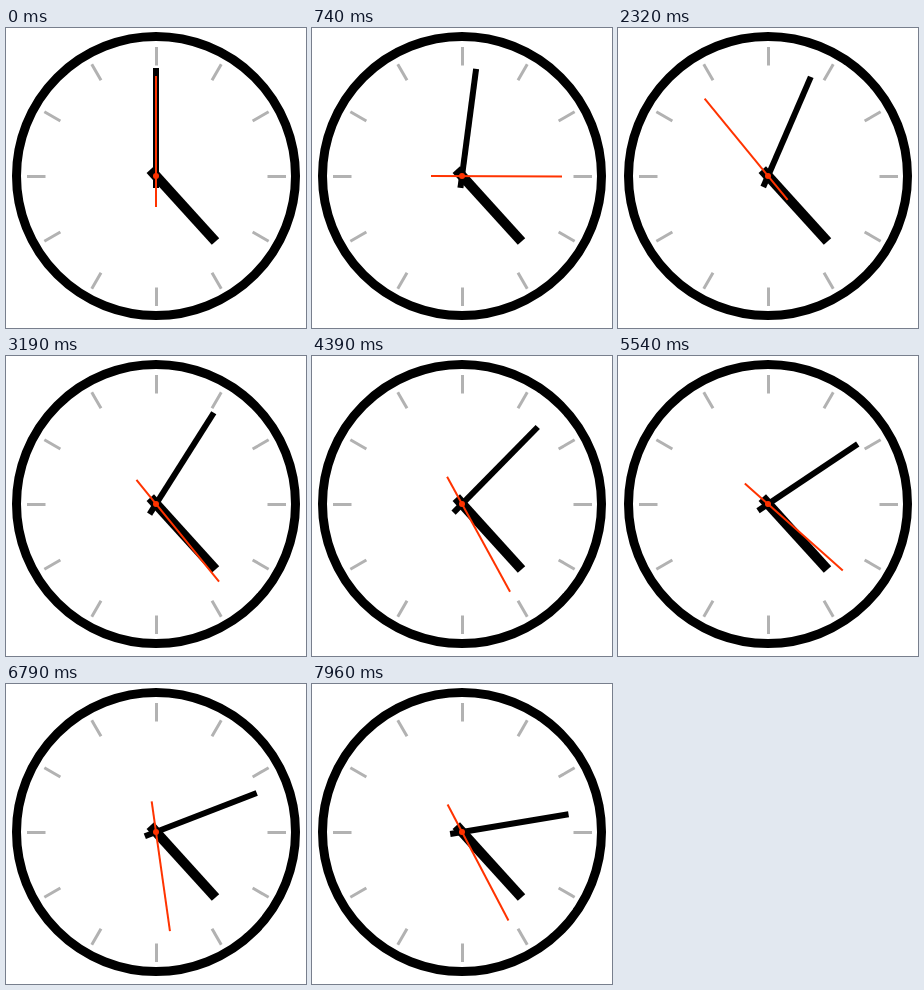
Animation, 300 px wide and 300 px high, one loop 7.99 s. Source, as an HTML page without scripts:

```html
<!DOCTYPE html>
<html lang="en">
<head>
<meta charset="utf-8">
<title>Clock</title>
<style>
  @property --t {
    syntax: "<number>";
    inherits: true;
    initial-value: 0;
  }

  html, body {
    margin: 0;
    width: 100%;
    height: 100%;
    overflow: hidden;
    background: #fff;
  }

  svg {
    display: block;
    width: 100%;
    height: 100%;
    animation: time 7990ms linear infinite;
  }

  /* Elapsed milliseconds, half a millisecond ahead so steps land on time */
  @keyframes time {
    from { --t: 0.5; }
    to { --t: 7990.5; }
  }

  /* Steps last 50 ms, except 7 in every 37 that last 30 ms.
     The second hand moves 3 ticks on a long step and 2 on a short one. */
  .hands {
    --guess: round(down, (37 * var(--t) + 300) / 1710, 1);
    --start: (50 * var(--guess) - 20 * round(down, (7 * var(--guess) + 15.5) / 37, 1));
    --step: (var(--guess) - round(up, clamp(0, var(--start) - var(--t), 1), 1));
    --ticks: (3 * var(--step) - round(down, (7 * var(--step) + 22.5) / 37, 1));
    --angle: 10.0048deg * var(--ticks);
  }

  .minute { transform: rotate(calc(var(--angle) / 60)); }
  .second { transform: rotate(calc(var(--angle))); }
</style>
</head>
<body>
<svg viewBox="0 0 300 300">
  <defs>
    <path id="tick" d="M0-129.5V-111M0 111V129.5"/>
    <g id="ticks">
      <use href="#tick"/>
      <use href="#tick" transform="rotate(30)"/>
      <use href="#tick" transform="rotate(60)"/>
    </g>
  </defs>

  <g transform="translate(150.5 148.5)" stroke="#b2b2b2" stroke-width="3">
    <use href="#ticks"/>
    <use href="#ticks" transform="rotate(90)"/>
  </g>

  <g transform="translate(150 148)">
    <circle r="139.5" fill="none" stroke="#000" stroke-width="9"/>
    <g class="hands">
      <path d="M0 8.5V-88.5" transform="rotate(137.75)" stroke="#000" stroke-width="10"/>
      <path class="minute" d="M0 12V-108" stroke="#000" stroke-width="6"/>
      <path class="second" d="M0 31V-100" stroke="#f30" stroke-width="2"/>
    </g>
    <circle r="3" fill="#f30"/>
  </g>
</svg>
</body>
</html>
```
